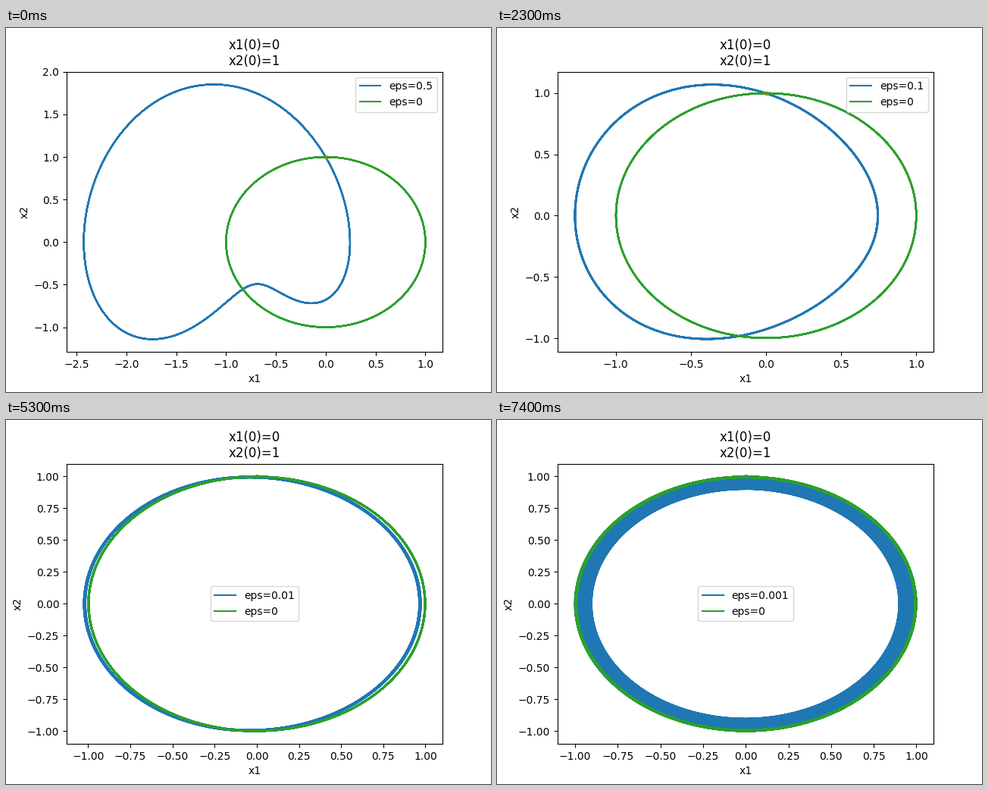
A matplotlib script for the animation above (8000 ms loop, 640 by 480 pixels).

```python
import numpy as np
import matplotlib.pyplot as plt
from matplotlib.animation import FuncAnimation

STEP_MS = 500
# steps held, eps, turns drawn, amplitude lost when forced / unforced, legend place
SCENES = [
    (1, 0.5, 6, 0.001, 0.001, "upper right"),
    (6, 0.1, 10, 0.004, 0.002, "upper right"),
    (6, 0.01, 30, 0.011, 0.004, "center"),
    (3, 0.001, 120, 0.1, 0.009, "center"),
]
TIMELINE = [scene for scene in SCENES for _ in range(scene[0])]


def orbit(eps, turns, loss):
    """Solution of x'' + x = -4 eps cos(t)^2 with a slow loss of amplitude."""
    t = np.linspace(0, 2 * np.pi * turns, 160 * turns + 1)
    amp = (1 - loss) ** (t / t[-1])
    a = 4 * eps / 3
    x1 = amp * (a * np.cos(t) + np.sin(t)) - 2 * eps + a / 2 * np.cos(2 * t)
    x2 = amp * (np.cos(t) - a * np.sin(t)) - a * np.sin(2 * t)
    return x1, x2


fig, ax = plt.subplots(figsize=(6.4, 4.8), dpi=100)


def update(step):
    _, eps, turns, loss, free_loss, place = TIMELINE[step]
    ax.clear()
    ax.plot(*orbit(eps, turns, loss), color="C0", label=f"eps={eps}")
    ax.plot(0, 1, ".", color="C1")
    ax.plot(*orbit(0, turns, free_loss), color="C2", label="eps=0")
    ax.set_title("x1(0)=0\nx2(0)=1")
    ax.set_xlabel("x1")
    ax.set_ylabel("x2")
    ax.legend(loc=place)


anim = FuncAnimation(fig, update, frames=len(TIMELINE), init_func=lambda: None,
                     interval=STEP_MS, repeat=True, repeat_delay=0)
plt.show()
```
